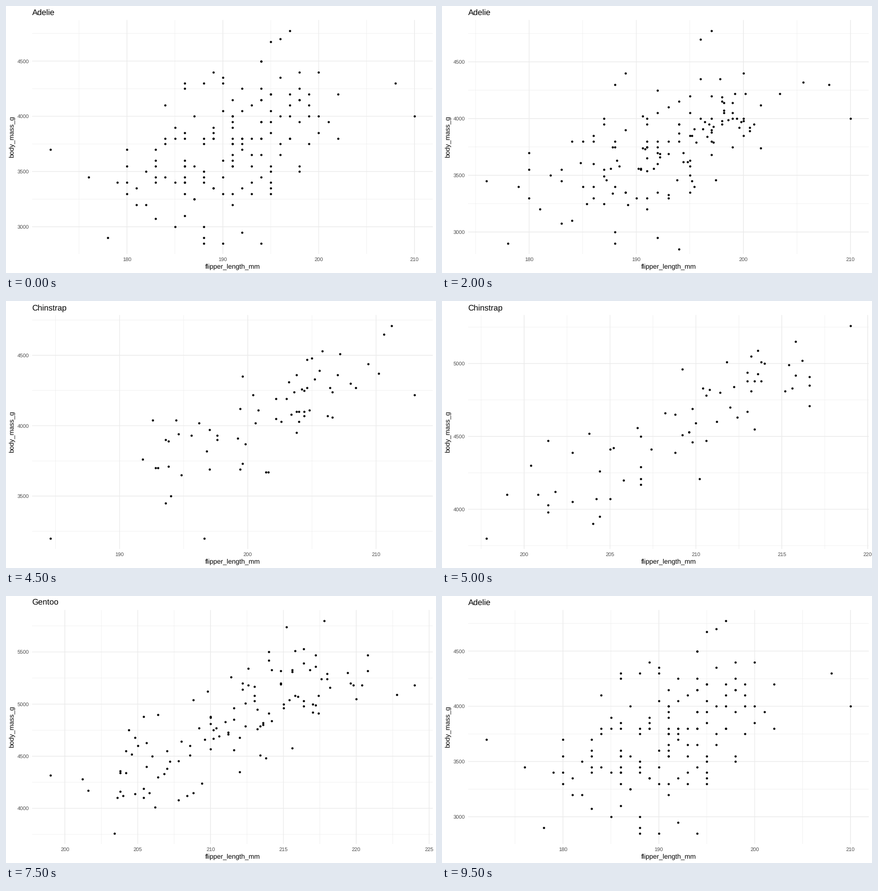
A matplotlib script for the animation above (10000 ms loop, 900x560 px).

```python
import numpy as np
import matplotlib.pyplot as plt
from matplotlib.animation import FuncAnimation

plt.rcParams.update({"font.family": "Liberation Sans", "text.hinting": "none",
                     "text.hinting_factor": 1})

W, H, DPI = 900, 560, 100
PX = 72 / DPI                                   # points per pixel
LEFT, RIGHT, TOP, BOTTOM = 54.6, 893.2, 29.5, 520.1
GRID, TICK = "#EBEBEB", "#4D4D4D"
SPECIES = ["Adelie", "Chinstrap", "Gentoo"]
COUNTS = [146, 68, 119]

# A few outlying birds (flipper, mass) span the view; birds in one row tween into each other.
TRIOS = np.array([
    [(195, 4675), (178, 2900), (211, 4400)],
    [(189, 3800), (210, 3700), (225, 6300)],
    [(186, 3100), (212, 4800), (208, 4350)],
    [(172, 3700), (192, 2700), (215, 5200)],
    [(190, 2850), (195, 3650), (231, 5650)],
    [(185, 3000), (205, 4500), (208, 3950)]])
ADELIE_GENTOO = np.array([
    [(183, 3075), (203, 4625)],
    [(208, 4300), (228, 5400)],
    [(196, 4700), (220, 6000)]])
ADELIE_ONLY = [(210, 4000), (197, 4775), (178, 2900), (176, 3450)]
PAIRED, TRIPLED = COUNTS[2], COUNTS[1]          # rows shared by two and by all species

# Mean, size effect and spread of flipper length and body mass.
MODELS = [((190.3, 3720), (2.4, 270), (4.6, 290)),
          ((196, 3730), (4.2, 200), (3.6, 220)),
          ((216.5, 5060), (4.3, 350), (2.8, 250))]

rng = np.random.default_rng(12)
size = rng.uniform(-1.7, 1.7, (max(COUNTS), 1))  # small to large, shared by a row


def make_birds(count, model):
    mean, effect, spread = map(np.array, model)
    noise = rng.standard_normal((count, 2)).clip(-1.7, 1.7)
    birds = mean + effect * size[:count] + spread * noise
    return np.round(birds / (1, 50)) * (1, 50)


BIRDS = [make_birds(n, model) for n, model in zip(COUNTS, MODELS)]
KEY = np.zeros(max(COUNTS), bool)


def place(state, start, rows):
    span = slice(start, start + len(rows))
    BIRDS[state][span] = rows
    KEY[span] = True


for i in range(3):
    place(i, 0, TRIOS[:, i])
place(0, TRIPLED, ADELIE_GENTOO[:, 0])
place(2, TRIPLED, ADELIE_GENTOO[:, 1])
place(0, PAIRED, ADELIE_ONLY)


def hold(state, n):
    return [(state, 0)] * n


def move(state, *fifths):
    return [(state, k / 5) for k in fifths]


TIMELINE = (hold(0, 2) + move(0, 1, 2, 3, 4) + hold(1, 3) + move(1, 1, 3, 4)
            + hold(2, 3) + move(2, 1, 2, 3, 4) + hold(0, 1))


def birds_at(state, t):
    """Tween paired birds; unpaired ones wait until the move is over."""
    a, b = BIRDS[state], BIRDS[(state + 1) % 3]
    if t == 0:
        return a
    n = min(len(a), len(b))
    return np.vstack([a[:n] * (1 - t) + b[:n] * t, a[n:]])


fig = plt.figure(figsize=(W / DPI, H / DPI), dpi=DPI, facecolor="white")
ax = fig.add_axes([0, 0, 1, 1])


def label(x, y, s, height, color="black", **kw):
    ax.text(x, y, s, fontsize=height * PX, color=color, va="baseline", **kw)


def ticks(lo, hi, step):
    return np.arange(np.ceil(lo / step), np.floor(hi / step) + 1) * step


def draw(frame):
    state, t = TIMELINE[frame]
    birds = birds_at(state, t)
    keys = birds[KEY[:len(birds)]]
    lo, hi = keys.min(0), keys.max(0)
    x_step, y_step = (5 if hi[0] - lo[0] < 26 else 10), 500
    lo, hi = lo - 0.05 * (hi - lo), hi + 0.05 * (hi - lo)

    def px(v):
        return LEFT + (v - lo[0]) / (hi[0] - lo[0]) * (RIGHT - LEFT)

    def py(v):
        return BOTTOM - (v - lo[1]) / (hi[1] - lo[1]) * (BOTTOM - TOP)

    ax.clear()
    ax.set(xlim=(0, W), ylim=(H, 0))
    ax.axis("off")
    for part, width in ((2, 0.68), (1, 1.36)):  # minor lines, then major
        style = dict(color=GRID, lw=width * PX, zorder=1 / part, snap=False)
        ax.vlines(px(ticks(lo[0], hi[0], x_step / part)), TOP, BOTTOM, **style)
        ax.hlines(py(ticks(lo[1], hi[1], y_step / part)), LEFT, RIGHT, **style)
    for v in ticks(lo[0], hi[0], x_step):
        label(px(v), 535, f"{v:.0f}", 11.2, TICK, ha="center")
    for v in ticks(lo[1], hi[1], y_step):
        label(48.2, py(v) + 4, f"{v:.0f}", 11.2, TICK, ha="right")

    inside = birds[((birds >= lo) & (birds <= hi)).all(1)]
    ax.plot(px(inside[:, 0]), py(inside[:, 1]), "o", color="black",
            ms=4.6 * PX, mew=0, zorder=3, snap=False)

    label(54.6, 19, SPECIES[(state + (t > 0.7)) % 3], 16.8, ha="left")
    label((LEFT + RIGHT) / 2, 551, "flipper_length_mm", 14, ha="center")
    label(16.6, (TOP + BOTTOM) / 2, "body_mass_g", 14, ha="center",
          rotation=90, rotation_mode="anchor")
    return []


anim = FuncAnimation(fig, draw, frames=len(TIMELINE), interval=500,
                     repeat=True, repeat_delay=0, init_func=lambda: [])
plt.show()
```
